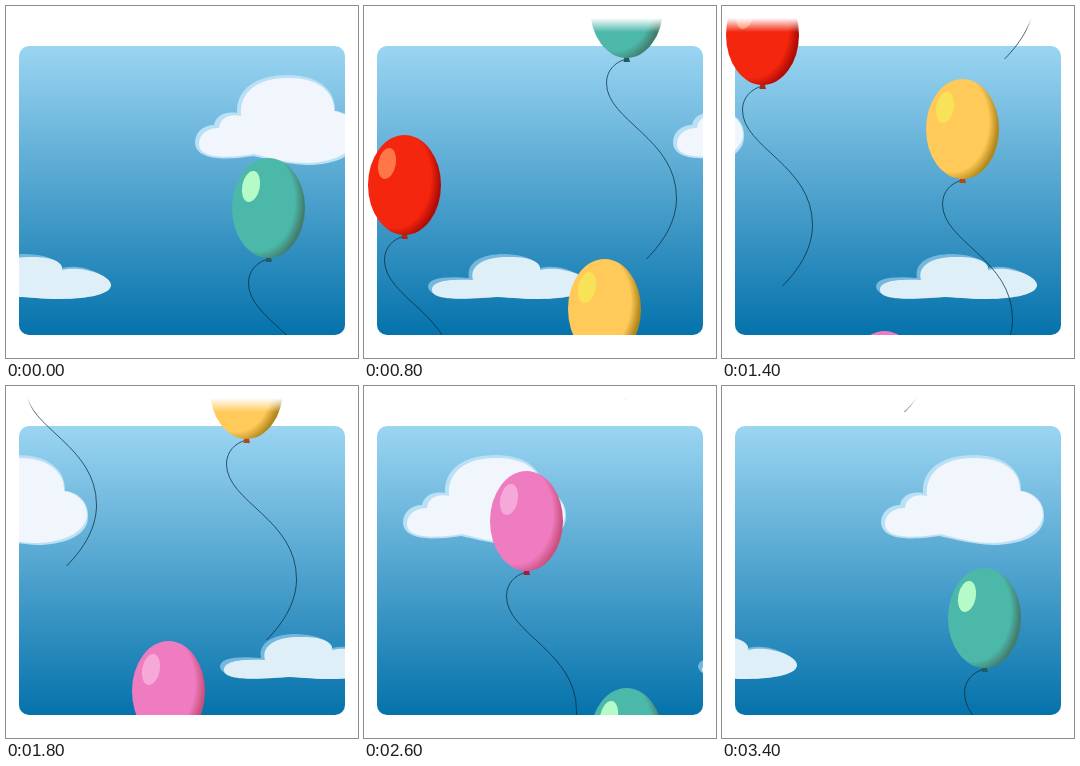
Write an HTML page that moves like this. It is 352 px wide and 352 px high and loops after 3.6 s.

```html
<!DOCTYPE html>
<html lang="en">
<head>
<meta charset="utf-8">
<title>Balloons</title>
<style>
  html, body { margin: 0; width: 100%; height: 100%; overflow: hidden; background: #fff; }
  svg { display: block; width: 100vw; height: 100vh; }
</style>
</head>
<body>
<svg viewBox="0 0 352 352">
  <defs>
    <linearGradient id="sky" x2="0" y2="1">
      <stop stop-color="#9bd5f2"/>
      <stop offset="1" stop-color="#0572ab"/>
    </linearGradient>
    <linearGradient id="fade" gradientUnits="userSpaceOnUse" x1="0" y1="12" x2="0" y2="26">
      <stop stop-color="#fff"/>
      <stop offset="1" stop-color="#fff" stop-opacity="0"/>
    </linearGradient>
    <clipPath id="window"><rect x="13" y="40" width="326" height="289" rx="10"/></clipPath>
    <clipPath id="floor"><rect width="352" height="329"/></clipPath>
    <g id="bigCloud">
      <path fill="#b9e0f5" d="M0 136C0 126 9 119 19 119C21 109 31 105 42 107C41 83 61 69 93 69C123 69 141 84 140 105C153 106 164 116 163 131C163 150 138 159 112 159C89 158 73 153 58 150C39 153 0 157 0 136Z"/>
      <path fill="#f1f6fc" d="M4 138C4 128 13 122 24 122C25 112 34 107 46 110C44 86 63 72 92 72C121 71 140 85 139 105C152 107 162 116 162 129C161 146 139 156 113 157C91 157 75 152 59 148C41 151 4 155 4 138Z"/>
    </g>
    <g id="smallCloud">
      <path fill="#75b7dd" d="M0 281C0 272 16 270 41 272C38 256 54 248 76 248C96 249 108 253 112 262C128 258 150 264 161 278C160 290 131 293 108 293L68 291C51 292 4 297 0 281Z"/>
      <path fill="#dfeff7" d="M4 284C4 276 16 273 45 274C41 260 56 251 78 251C101 250 114 256 112 264C131 259 161 269 161 279C161 290 131 293 108 293C91 293 78 291 68 291C51 292 4 297 4 284Z"/>
    </g>
  </defs>
  <g clip-path="url(#window)">
    <rect x="13" y="40" width="326" height="289" fill="url(#sky)"/>
    <g id="clouds"></g>
  </g>
  <g id="balloons" clip-path="url(#floor)"></g>
  <rect width="352" height="26" fill="url(#fade)"/>
</svg>
<script>
const STEP = 200, STEPS = 18, CLOUD_STEP = 30, SPAN = CLOUD_STEP * STEPS;

// keys: [step, top edge of the balloon]
const balloons = [
  { x: 262.5, base: '#4cb8aa', dark: '#427d6d', shine: '#b5fbc8', knot: '#215b69', wrap: 12,
    keys: [[-5, 302], [0, 152], [5, -98], [7, -248], [9, -398]] },
  { x: 40.5, base: '#f4260e', dark: '#b00b07', shine: '#ff7648', knot: '#a8281c', wrap: STEPS,
    keys: [[0, 329], [13, -321]] },
  { x: 240.5, base: '#ffca59', dark: '#b3881b', shine: '#f8e257', knot: '#b5471b', wrap: STEPS,
    keys: [[3, 313], [14, -347]] },
  { x: 162.5, base: '#ef7cc0', dark: '#cb5180', shine: '#f5a9d8', knot: '#9b2040', wrap: STEPS,
    keys: [[7, 325], [9, 255], [12, 135], [13, 85], [14, 15], [15, -75], [17, -275]] }
];
const clouds = [{ id: 'bigCloud', x: 189 }, { id: 'smallCloud', x: -56 }];

const STRING = 'M0 101C-12 104-20 113-20 125C-20 163 50 180 50 240C50 262 38 283 20 301';

function add(parent, tag, attrs) {
  const el = document.createElementNS('http://www.w3.org/2000/svg', tag);
  for (const name in attrs) el.setAttribute(name, attrs[name]);
  return parent.appendChild(el);
}

const defs = document.querySelector('defs');
balloons.forEach((b, i) => {
  const shade = add(defs, 'radialGradient', { id: 'shade' + i, cx: .36, cy: .43, r: .64 });
  add(shade, 'stop', { offset: .78, 'stop-color': b.base });
  add(shade, 'stop', { offset: .98, 'stop-color': b.dark });

  b.el = add(document.getElementById('balloons'), 'g', {});
  add(b.el, 'path', { d: STRING, fill: 'none', stroke: '#06283a', 'stroke-opacity': .8, 'stroke-width': .9 });
  add(b.el, 'path', { d: 'M-2 98H2L3.5 104H-3Z', fill: b.knot });
  add(b.el, 'ellipse', { cy: 50, rx: 36.5, ry: 50, fill: `url(#shade${i})` });
  add(b.el, 'ellipse', { rx: 8.8, ry: 15.7, fill: b.shine, transform: 'translate(-17.5 28.5) rotate(11)' });
});

for (const c of clouds) {
  c.el = add(document.getElementById('clouds'), 'g', {});
  for (const x of [0, -SPAN]) add(c.el, 'use', { href: '#' + c.id, x });
}

function topAt(keys, step) {
  for (let i = 1; i < keys.length; i++) {
    const [s0, y0] = keys[i - 1], [s1, y1] = keys[i];
    if (step >= s0 && step <= s1) return y0 + (y1 - y0) * (step - s0) / (s1 - s0);
  }
  return 400;
}

function draw(ms) {
  const step = Math.floor(ms / STEP) % STEPS;
  for (const b of balloons) {
    const y = topAt(b.keys, step >= b.wrap ? step - STEPS : step);
    b.el.setAttribute('transform', `translate(${b.x} ${y})`);
  }
  for (const c of clouds) c.el.setAttribute('transform', `translate(${c.x + step * CLOUD_STEP} 0)`);
}

let start;
function tick(now) {
  start ??= now;
  draw(now - start);
  requestAnimationFrame(tick);
}
draw(0);
requestAnimationFrame(tick);
</script>
</body>
</html>
```
